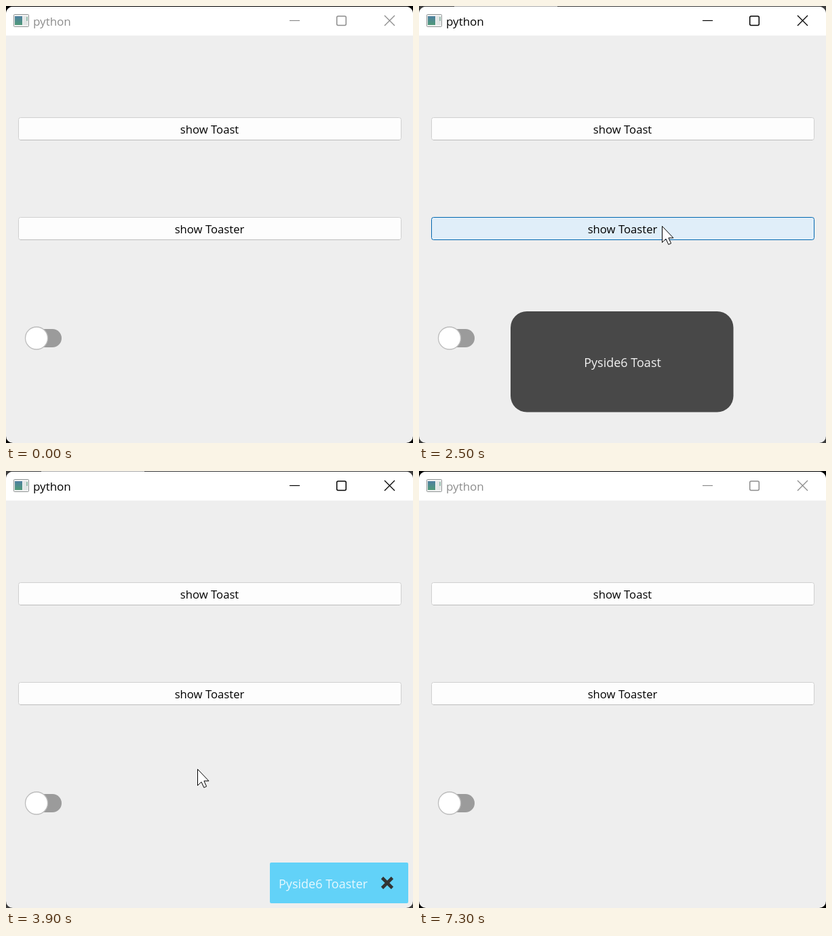
Recreate the animation shown at these times as an HTML page. Size 600 px wide and 644 px high, loop 7400 ms.

```html
<!DOCTYPE html>
<html lang="en">
<head>
<meta charset="utf-8">
<title>python</title>
<style>
  html, body { margin: 0; width: 100%; height: 100%; overflow: hidden; background: #000; }
  svg { display: block; width: 600px; height: 644px; font-family: "Open Sans", "Noto Sans", sans-serif; }
  .button rect { fill: #fdfdfd; stroke: #d0d0d0; }
  .button path { stroke: #bcbcbc; }
  .hover rect { fill: #e0eef9; stroke: #0067b0; }
  .pressed rect { fill: #cce4f7; stroke: #005499; }
  .hover path, .pressed path { display: none; }
  .button text, #toast text { text-anchor: middle; }
  .button text { font-size: 16.7px; }
  #toast text, #toaster text { font-size: 18px; }
</style>
</head>
<body>
<svg viewBox="0 0 600 644">
  <defs>
    <linearGradient id="teal" x2="0" y2="1">
      <stop stop-color="#4d7fa0"/><stop offset="1" stop-color="#4f9a78"/>
    </linearGradient>
  </defs>

  <g id="desktop">
    <rect width="600" height="644" fill="#3c3c3c"/>
    <rect x="52" width="152" height="1" fill="#aaa"/>
  </g>
  <rect y="1" width="600" height="643" rx="10" fill="#eee"/>
  <path d="M0 44V11A10 10 0 0 1 10 1H590A10 10 0 0 1 600 11V44z" fill="#fff"/>
  <path d="M0 43.5H600" stroke="#f7f7f7"/>

  <rect x="11.5" y="12.5" width="22" height="18" rx="1" fill="#f2f2f2" stroke="#8f9494"/>
  <rect x="13" y="15" width="11" height="13" fill="url(#teal)"/>
  <rect x="25" y="15" width="7" height="13" fill="#e2e6e6"/>
  <path d="M31 16V22" stroke="#4f9a78"/>

  <g id="title">
    <text x="40" y="29" font-size="17">python</text>
    <path d="M418 21.5H433" stroke="#000" stroke-width="1.2"/>
    <rect x="487.7" y="15" width="13.6" height="13.4" rx="2" fill="none" stroke="#000" stroke-width="1.5"/>
    <path d="M558 14L573 29M573 14L558 29" stroke="#000" stroke-width="1.3"/>
  </g>

  <g class="button">
    <rect x="18.5" y="164.5" width="564" height="33" rx="3"/>
    <path d="M21 197.5H580"/>
    <text x="300" y="188">show Toast</text>
  </g>
  <g class="button">
    <rect x="18.5" y="311.5" width="564" height="33" rx="3"/>
    <path d="M21 344.5H580"/>
    <text x="300" y="335">show Toaster</text>
  </g>

  <circle id="pulse" cy="489.5"/>
  <rect id="bar" x="36" y="476" width="46" height="27" rx="13.5"/>
  <circle id="knob" cy="489.5" r="16.5" stroke="#bdbdbd" stroke-width="1.3"/>

  <g id="toast">
    <rect x="135" y="450" width="328.5" height="148.5" rx="24" fill="#484848"/>
    <text x="300" y="532" fill="#f2f2f2">Pyside6 Toast</text>
  </g>
  <g id="toaster">
    <rect x="389" y="577" width="204" height="60" rx="2" fill="#62d2f8"/>
    <text x="402" y="615" fill="#e6f8fe">Pyside6 Toaster</text>
    <path d="M554.5 599.5L569.5 614.5M569.5 599.5L554.5 614.5" stroke="#333" stroke-width="4.6"/>
  </g>

  <path id="cursor" d="M.5 .5V24.5L6 19.2L9.8 27.5L13.6 25.8L9.9 17.8H17z" fill="#fff" stroke="#000"/>
</svg>

<script>
const LOOP = 7400, STEP = 100;
const $ = id => document.getElementById(id);
const buttons = [...document.querySelectorAll('.button')];
const clamp = v => Math.max(0, Math.min(1, v));
const during = (t, from, to) => t >= from && t < to;
const cubic = p => p < .5 ? 4 * p ** 3 : 1 - (2 - 2 * p) ** 3 / 2;

// pointer path: time, x, y
const path = [
  [400, 336, 650], [500, 334, 620], [1200, 312, 180], [1700, 312, 180],
  [2200, 275, 322], [2500, 358, 324], [3500, 358, 324], [3900, 282, 439],
  [4400, 100, 480], [4600, 61, 486], [6200, 61, 486], [6300, 60, 400],
  [6400, 58, 76], [7200, 602, 45]
];

function pointer(t) {
  if (t <= path[0][0]) return [0, 700];
  const i = path.findIndex(p => p[0] >= t);
  if (i < 0) return [0, 700];
  const [t0, x0, y0] = path[i - 1], [t1, x1, y1] = path[i];
  const p = (t - t0) / (t1 - t0);
  return [x0 + (x1 - x0) * p, y0 + (y1 - y0) * p];
}

function drawButton(i, top, [x, y], pressed) {
  const over = x >= 18 && x < 583 && y >= top && y < top + 34;
  buttons[i].setAttribute('class', 'button' + (pressed ? ' pressed' : over ? ' hover' : ''));
}

function drawToggle(t) {
  const ON = 4770, OFF = 5690, SLIDE = 200, PULSE = 350;
  const on = during(t, ON, OFF);
  const since = t - (t < OFF ? ON : OFF);
  const p = cubic(clamp(since / SLIDE));
  const x = 45 + 28 * (t < OFF ? p : 1 - p);
  const grow = (since - SLIDE) / PULSE;
  $('bar').setAttribute('fill', on ? '#80d8ff' : '#9b9b9b');
  $('knob').setAttribute('fill', on ? '#00b0ff' : '#fff');
  $('knob').setAttribute('cx', x);
  $('pulse').setAttribute('cx', x);
  $('pulse').setAttribute('r', during(grow, 0, 1) ? 15 + 15 * grow : 0);
  $('pulse').setAttribute('fill', on ? 'rgba(0,176,238,.267)' : 'rgba(153,153,153,.267)');
}

function draw(t) {
  const active = t < 7300 ? clamp((t - 100) / 200) : 0;
  $('desktop').style.opacity = active;
  $('title').style.opacity = .45 + .55 * active;

  const at = pointer(t);
  $('cursor').setAttribute('transform', `translate(${at})`);
  drawButton(0, 164, at, during(t, 1500, 1600));
  drawButton(1, 311, at, during(t, 3000, 3200));
  drawToggle(t);

  $('toast').style.opacity = clamp(Math.min((t - 1550) / 200, (2990 - t) / 200));
  $('toaster').style.opacity = clamp(Math.min((t - 3150) / 200, (4650 - t) / 500));
}

const start = performance.now();
function tick() {
  const t = (performance.now() - start) % LOOP;
  draw(Math.floor(t / STEP) * STEP);
  requestAnimationFrame(tick);
}
tick();
</script>
</body>
</html>
```
